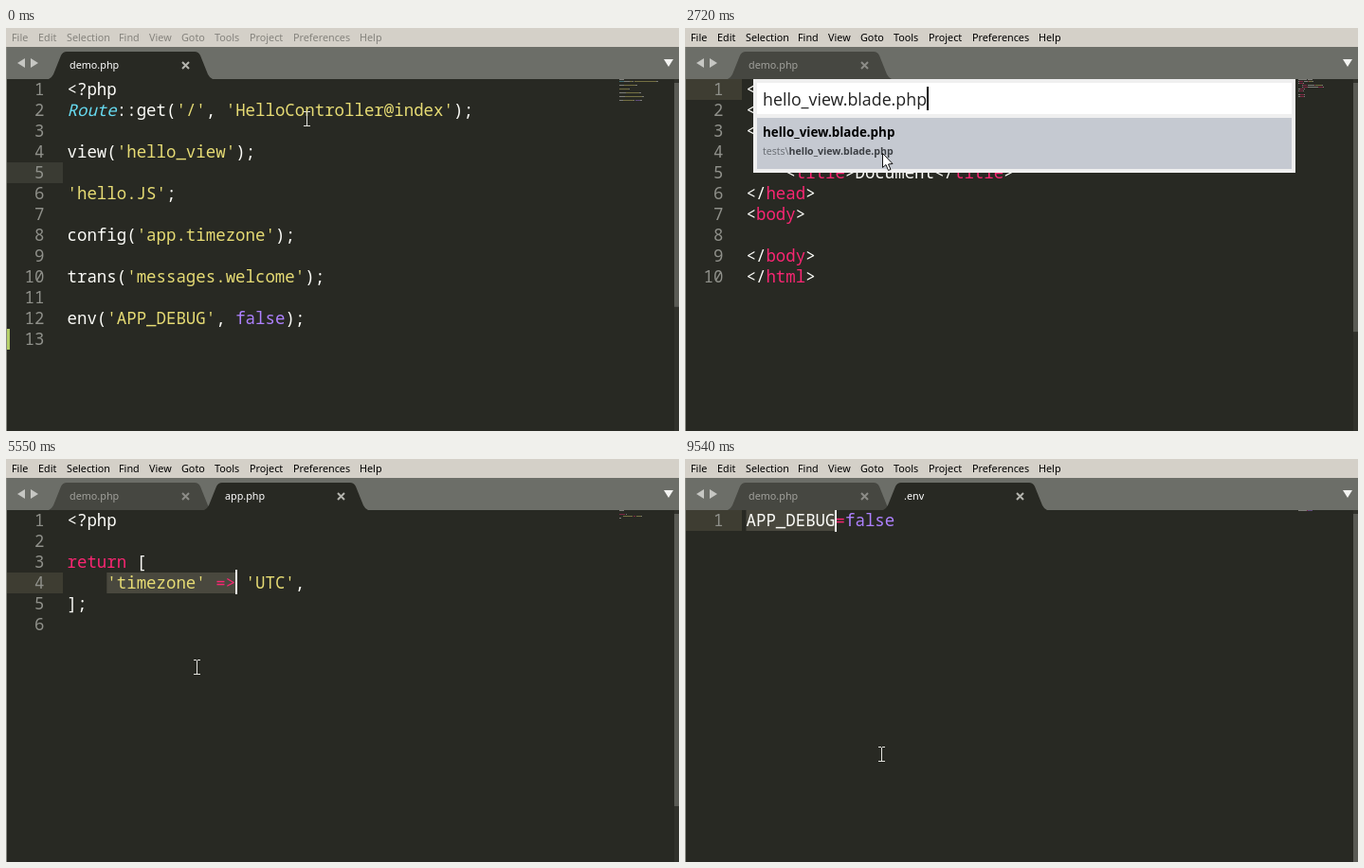
Recreate the animation shown at these times as an HTML page with a canvas. Size 710 by 426 pixels, loop 9.59 s.

```html
<!DOCTYPE html>
<html lang="en">
<head>
<meta charset="utf-8">
<title>Editor goto demo</title>
<style>
html, body { margin: 0; width: 100%; height: 100%; overflow: hidden; background: #282923; }
canvas { display: block; }
</style>
</head>
<body>
<canvas id="stage" width="710" height="426"></canvas>
<script>
const ctx = document.getElementById('stage').getContext('2d');
const LOOP = 9590, LEFT = 64.5, TOP = 54, ROW = 22, CHAR = 10.45;
const MONO = '500 17.42px "Noto Sans Mono", monospace';
const UI = '10.8px "Noto Sans", sans-serif';
const SANS = '"Open Sans", sans-serif';
const WHITE = '#fcfcf8', YELLOW = '#e6db74', CYAN = '#66d9ef', PURPLE = '#ae81ff', PINK = '#f92672';

const files = {
  demo: `<?php
Route::get('/', 'HelloController@index');

view('hello_view');

'hello.JS';

config('app.timezone');

trans('messages.welcome');

env('APP_DEBUG', false);
`,
  controller: `<?php

namespace App\\Http\\Controllers;

class HelloController extends Controller
{
    public function index()
    {
        return view('hello_view');
    }
}`,
  blade: `<!DOCTYPE html>
<html lang="en">
<head>
    <meta charset="UTF-8">
    <title>Document</title>
</head>
<body>

</body>
</html>`,
  script: `alert('hello');`,
  app: `<?php

return [
    'timezone' => 'UTC',
];
`,
  messages: `<?php
return [
    'welcome' => 'Welcome',
];`,
  env: 'APP_DEBUG=false'
};
for (const name in files) files[name] = files[name].split('\n');

// at: start; blink: moment the caret phase begins; caret: x inside the popup's input
const scenes = [
  { at: 0, file: 'demo', row: 5 },
  { at: 340, file: 'demo', row: 2, col: 24, blink: 340 },
  { at: 390, file: 'controller', row: 7, popup: 'HelloController.php@index', name: 'HelloController.php', caret: 309, blink: 340 },
  { at: 1110, file: 'demo', row: 2, col: 24, blink: 1010 },
  { at: 1940, file: 'demo', row: 4, col: 14, blink: 1940 },
  { at: 1990, file: 'blade', row: 1, popup: 'hello_view.blade.php', caret: 255, blink: 1990 },
  { at: 2770, file: 'demo', row: 4, col: 14, blink: 2670 },
  { at: 3510, file: 'demo', row: 6, col: 4, blink: 3510 },
  { at: 3570, file: 'script', row: 1, popup: 'hello.JS', caret: 143, blink: 3540 },
  { at: 4280, file: 'demo', row: 6, col: 4, blink: 4280 },
  { at: 5430, file: 'demo', row: 8, col: 13, blink: 5430 },
  { at: 5490, file: 'app', row: 4, col: 17, from: 4, tab: 'app.php', blink: 5490 },
  { at: 6220, file: 'demo', row: 8, col: 13, blink: 6170 },
  { at: 6910, file: 'demo', row: 10, col: 12, blink: 6910 },
  { at: 7150, file: 'messages', row: 1, popup: 'resources/lang/messages.php', caret: 330, blink: 7060 },
  { at: 7770, file: 'demo', row: 10, col: 12, blink: 7720 },
  { at: 8700, file: 'demo', row: 12, col: 14, blink: 8700 },
  { at: 8760, file: 'env', row: 1, col: 9, from: 0, tab: '.env', blink: 8760 }
];

// Pointer moves: start, end, x, y
const moves = [
  [0, 0, 317, 96], [50, 100, 314, 88], [1400, 1890, 208, 132], [2850, 3380, 107, 175],
  [4420, 4770, 150, 200], [4990, 5380, 201, 220], [6250, 6680, 191, 268],
  [8310, 8650, 205, 309], [9490, 9540, 207, 312]
];
const arrowTimes = [[1990, 2850], [7150, 8310]];
const altTimes = [[1800, 2250], [3400, 3660], [4750, 5540], [6700, 7200], [8600, 9000]];
const within = (spans, t) => spans.some(([a, b]) => t >= a && t < b);

const menu = [['File', 6, 0], ['Edit', 34, 0], ['Selection', 64, 0], ['Find', 119, 1], ['View', 151, 0],
  ['Goto', 185, 0], ['Tools', 220, 0], ['Project', 257, 0], ['Preferences', 303, 7], ['Help', 373, 0]];

function rect(x, y, w, h, color) {
  ctx.fillStyle = color;
  ctx.fillRect(x, y, w, h);
}
function text(str, x, y, font, color) {
  ctx.font = font;
  ctx.fillStyle = color;
  ctx.fillText(str, x, y);
  return x + ctx.measureText(str).width;
}
function poly(points, color, stroke) {
  ctx.beginPath();
  points.forEach(([x, y]) => ctx.lineTo(x, y));
  ctx.closePath();
  ctx.fillStyle = color;
  ctx.fill();
  if (stroke) {
    ctx.strokeStyle = stroke;
    ctx.lineWidth = 1;
    ctx.stroke();
  }
}

const TOKEN = /(["'][^"']*["'])|\b(Route)\b|\b(false)\b|(=>?|\b(?:return|class|extends|public|function)\b|(?<=<\/?)[a-z]+)/g;
function tokens(line) {
  const out = [];
  let end = 0;
  for (const m of line.matchAll(TOKEN)) {
    out.push([line.slice(end, m.index), end, WHITE]);
    out.push([m[0], m.index, m[1] ? YELLOW : m[2] ? CYAN : m[3] ? PURPLE : PINK]);
    end = m.index + m[0].length;
  }
  out.push([line.slice(end), end, WHITE]);
  return out;
}

function drawMenu(active, alt) {
  rect(0, 0, 710, 20, '#d4d0c8');
  for (const [label, x, key] of menu) {
    text(label, x, 14, UI, active ? '#000' : '#85837d');
    if (alt) {
      const before = ctx.measureText(label.slice(0, key)).width;
      rect(Math.round(x + before), 15, Math.round(ctx.measureText(label[key]).width), 1, '#000');
    }
  }
}

function drawTab(x, label, active) {
  ctx.beginPath();
  ctx.moveTo(x, 54);
  ctx.quadraticCurveTo(x + 3, 53, x + 5, 49);
  ctx.lineTo(x + 13, 29);
  ctx.quadraticCurveTo(x + 15, 25, x + 19, 25);
  ctx.lineTo(x + 154, 25);
  ctx.quadraticCurveTo(x + 158, 25, x + 160, 29);
  ctx.lineTo(x + 168, 49);
  ctx.quadraticCurveTo(x + 170, 53, x + 173, 54);
  ctx.fillStyle = active ? '#282923' : '#464741';
  ctx.fill();
  text(label, x + 22, 43, UI, active ? '#fff' : '#a0a09b');
  ctx.strokeStyle = active ? '#b4b4ae' : '#8c8c87';
  ctx.lineWidth = 2;
  ctx.beginPath();
  ctx.moveTo(x + 141, 36); ctx.lineTo(x + 148, 43);
  ctx.moveTo(x + 148, 36); ctx.lineTo(x + 141, 43);
  ctx.stroke();
}

function drawTabs(scene) {
  rect(0, 20, 710, 34, '#6c6e68');
  poly([[12, 37], [20, 32], [20, 42]], '#c6c7c3');
  poly([[34, 37], [26, 32], [26, 42]], '#c6c7c3');
  poly([[694, 33], [704, 33], [699, 41]], '#f4f4f2');
  drawTab(45, 'demo.php', scene.file === 'demo');
  if (scene.tab) drawTab(209, scene.tab, true);
}

function drawCode(scene, caretAlpha) {
  const lines = files[scene.file], y = TOP + (scene.row - 1) * ROW, hasCaret = 'col' in scene;
  rect(1, y, 59, ROW, scene.blink === undefined ? '#3a3b33' : '#3e3d32');
  if ('from' in scene) {
    rect(LEFT + scene.from * CHAR, y, (scene.col - scene.from) * CHAR, ROW, '#49483e');
  }
  lines.forEach((line, i) => {
    const base = TOP + i * ROW + 17;
    ctx.textAlign = 'right';
    text(i + 1, 40.5, base, MONO, '#8f908a');
    ctx.textAlign = 'left';
    for (const [str, col, color] of tokens(line)) {
      text(str, LEFT + col * CHAR, base, (color === CYAN ? 'italic ' : '') + MONO, color);
      // Minimap: one dot per character
      ctx.globalAlpha = 0.4;
      [...str].forEach((c, k) => c !== ' ' && rect(647 + col + k, TOP + i * 2, 1, 1, color));
      ctx.globalAlpha = 1;
    }
  });
  if (scene.file === 'demo') rect(1, TOP + 12 * ROW, 3, ROW, '#b5cf68');
  if (hasCaret) {
    const line = lines[scene.row - 1], open = line.indexOf('(');
    if (open >= 0) {
      for (const col of [open, line.lastIndexOf(')')]) rect(LEFT + col * CHAR, y + 21, CHAR, 1, '#c8c8c0');
    }
    ctx.globalAlpha = caretAlpha;
    const top = Math.max(TOP, y - 3);
    rect(Math.floor(LEFT + scene.col * CHAR), top, 2, y + 23 - top, WHITE);
    ctx.globalAlpha = 1;
  }
  // Scrollbar length follows the number of lines
  const view = 395;
  rect(705, 54, 5, 372, '#30312b');
  rect(705, 58, 5, view * view / (view + (lines.length - 1) * ROW), '#5a5b55');
}

function drawPopup(scene, caretAlpha) {
  const name = scene.name || scene.popup;
  rect(72, 54, 572, 99, '#efefef');
  rect(76, 58, 564, 33, '#fff');
  rect(76, 95, 564, 54, '#c5c9d1');
  text(scene.popup, 82, 82, '17.8px ' + SANS, '#222');
  text(name.split('/').pop(), 82, 115, 'bold 13.4px ' + SANS, '#000');
  const x = text('tests\\', 82, 134, '10.6px ' + SANS, '#666a70');
  text(name.replace(/\//g, '\\'), x, 134, 'bold 10.6px ' + SANS, '#3c3f44');
  ctx.globalAlpha = caretAlpha;
  rect(scene.caret, 62, 2, 25, '#000');
  ctx.globalAlpha = 1;
}

function drawPointer(t) {
  let x = 0, y = 0;
  for (const [start, end, toX, toY] of moves) {
    if (t < start) break;
    const p = end > start ? Math.min(1, (t - start) / (end - start)) : 1;
    const eased = p * p * (3 - 2 * p);
    x += (toX - x) * eased;
    y += (toY - y) * eased;
  }
  x = Math.round(x);
  y = Math.round(y);
  if (within(arrowTimes, t)) {
    const shape = [[0, 0], [0, 15], [3.5, 12], [6, 18], [8.5, 17], [6, 11.5], [10.5, 11]];
    poly(shape.map(([a, b]) => [x + a + 0.5, y + b + 0.5]), '#fff', '#111');
  } else {
    rect(x, y - 7, 1, 15, '#e4e4df');
    for (const edge of [y - 8, y + 7]) {
      rect(x - 3, edge, 3, 1, '#e4e4df');
      rect(x + 1, edge, 3, 1, '#e4e4df');
    }
  }
}

function caretLevel(t, start) {
  const phase = (t - start) % 680;
  if (phase < 340) return 1;
  return phase < 390 ? 0.5 : 0;
}

function draw(t) {
  const scene = scenes.findLast(s => t >= s.at);
  const alpha = caretLevel(t, scene.blink);
  rect(0, 0, 710, 426, '#282923');
  drawMenu(scene.at > 0, within(altTimes, t));
  drawTabs(scene);
  drawCode(scene, alpha);
  rect(0, 20, 1, 406, '#85867f');
  if (scene.popup) drawPopup(scene, alpha);
  drawPointer(t);
}

const began = performance.now();
function tick() {
  draw((performance.now() - began) % LOOP);
  requestAnimationFrame(tick);
}
tick();
</script>
</body>
</html>
```
